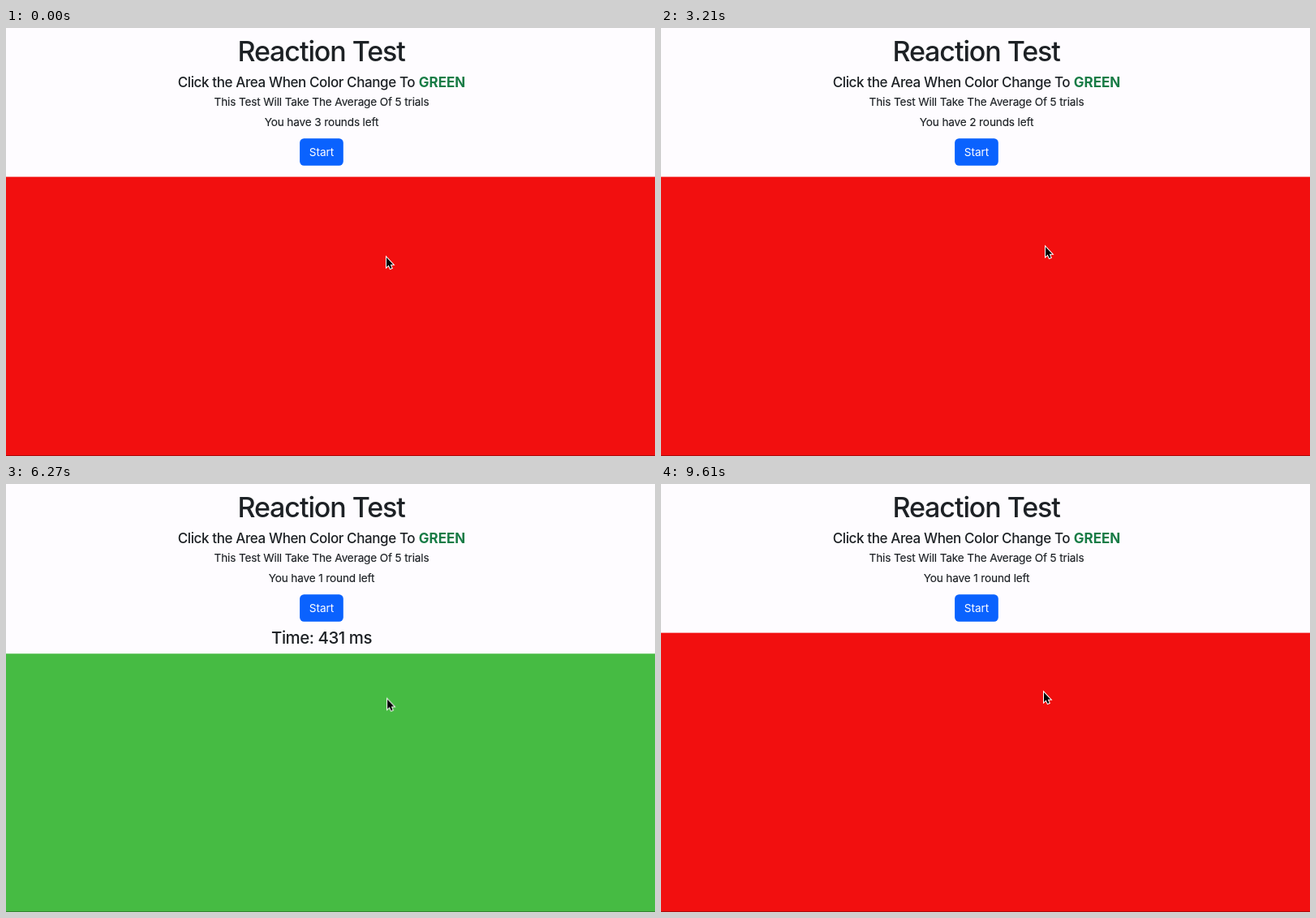
Write an HTML page that moves like this. It is 800 px wide and 528 px high and loops after 9640 ms.

```html
<!DOCTYPE html>
<html lang="en">
<head>
<meta charset="utf-8">
<title>Reaction Test</title>
<style>
  html, body { margin: 0; width: 100%; height: 100%; overflow: hidden; background: #fefcff; }
  svg { display: block; width: 800px; height: 528px; }
  text {
    font-family: Inter, "Liberation Sans", sans-serif;
    font-optical-sizing: none;
    text-anchor: middle;
    fill: #1d2125;
  }
  .title { font-size: 34px; font-weight: 500; letter-spacing: -1.08px; }
  .lead { font-size: 17px; font-weight: 500; letter-spacing: -.39px; }
  .green { font-weight: 700; letter-spacing: 0; fill: #187c46; }
  .body { font-size: 13.6px; letter-spacing: -.14px; stroke: #1d2125; stroke-width: .15px; }
  .label { font-size: 13.6px; fill: #fff; }
  .time { font-size: 20.4px; font-weight: 500; letter-spacing: -.45px; }

  .loop { animation: 9.64s step-end infinite; }
  .area { animation-name: shift; }
  .fill { animation-name: signal; }
  .button { animation-name: press; }
  .three { animation-name: three; }
  .two { animation-name: two; }
  .one { animation-name: one; }
  .first { animation-name: first; }
  .second { animation-name: second; }
  .arrow { animation-name: arrow; }
  .hand { animation-name: hand; }
  .pointer { animation-name: travel; animation-timing-function: ease-in-out; }

  @keyframes signal {
    0%, 27.2%, 71.9%, 100% { fill: #f20f0f; }
    6.64%, 58.5% { fill: #46bb43; }
  }
  @keyframes shift {
    0%, 27.2%, 71.9%, 100% { transform: translateY(0); }
    12.68%, 62.97% { transform: translateY(25.5px); }
  }
  @keyframes press {
    0%, 29.2%, 83.1%, 100% { fill: #0a62fe; }
    21.3%, 68.6%, 73.2% { fill: #0a50d0; }
    71.2% { fill: #094bc4; }
  }
  @keyframes three {
    0% { visibility: visible; }
    12.68%, 100% { visibility: hidden; }
  }
  @keyframes two {
    0%, 62.97%, 100% { visibility: hidden; }
    12.68% { visibility: visible; }
  }
  @keyframes one {
    0% { visibility: hidden; }
    62.97%, 100% { visibility: visible; }
  }
  @keyframes first {
    0%, 27.2%, 100% { visibility: hidden; }
    12.68% { visibility: visible; }
  }
  @keyframes second {
    0%, 71.9%, 100% { visibility: hidden; }
    62.97% { visibility: visible; }
  }
  @keyframes arrow {
    0%, 29.2%, 83.1%, 100% { visibility: visible; }
    21.3%, 68.6% { visibility: hidden; }
  }
  @keyframes hand {
    0%, 29.2%, 83.1%, 100% { visibility: hidden; }
    21.3%, 68.6% { visibility: visible; }
  }
  @keyframes travel {
    0%, 15.56% { transform: translate(468px, 281px); }
    22.8%, 28.4% { transform: translate(394px, 160px); }
    32.4%, 36.3% { transform: translate(473px, 268px); }
    38.4%, 64.1% { transform: translate(473.5px, 270px); }
    69.7%, 81.95% { transform: translate(398px, 160px); }
    87.7%, 100% { transform: translate(471px, 255px); }
  }
</style>
</head>
<body>
<svg viewBox="0 0 800 528">
  <text class="title" x="388.6" y="41">Reaction Test</text>
  <text class="lead" x="358" y="73">Click the Area When Color Change To</text>
  <text class="lead green" x="537.5" y="73">GREEN</text>
  <text class="body" x="389" y="96">This Test Will Take The Average Of 5 trials</text>
  <text class="body loop three" x="389" y="120.5">You have 3 rounds left</text>
  <text class="body loop two" x="389" y="120.5">You have 2 rounds left</text>
  <text class="body loop one" x="389" y="120.5">You have 1 round left</text>

  <rect class="loop button" x="362.1" y="136.3" width="53.7" height="33.4" rx="5.2"/>
  <text class="label" x="389" y="158.4">Start</text>
  <text class="time loop first" x="389" y="196.5">Time: 582 ms</text>
  <text class="time loop second" x="389" y="196.5">Time: 431 ms</text>

  <g class="loop area">
    <rect class="loop fill" y="183.6" width="800" height="345"/>
  </g>
  <rect y="527" width="800" height="1" opacity=".3"/>

  <g class="loop pointer">
    <path class="loop arrow" d="M1 2V14L3.7 11.5 5.7 15.9 7.6 15.1 5.7 10.7H9.2Z"
      fill="#000" stroke="#fff" stroke-width="2" paint-order="stroke"/>
    <path class="loop hand" fill="#fff" stroke="#000" stroke-width=".9" stroke-linejoin="round"
      d="M-.9 1.6C-1.2 0 .8-.5 1.3 1L2.5 5C2.9 3.9 4.3 4 4.6 5.2 5.1 4.3 6.4 4.5 6.6 5.7
         7.4 5 8.5 5.6 8.6 6.8L8.7 9.3C8.7 11 7.7 11.8 7.6 14.3H2.3C1.8 12.3-.7 10.6-2.2 8.7
         -3.1 7.4-1.7 6.6-.7 7.4L.6 8.5ZM3.2 9.3V12M5 9.3V12M6.7 9.3V12"/>
  </g>
</svg>
</body>
</html>
```
